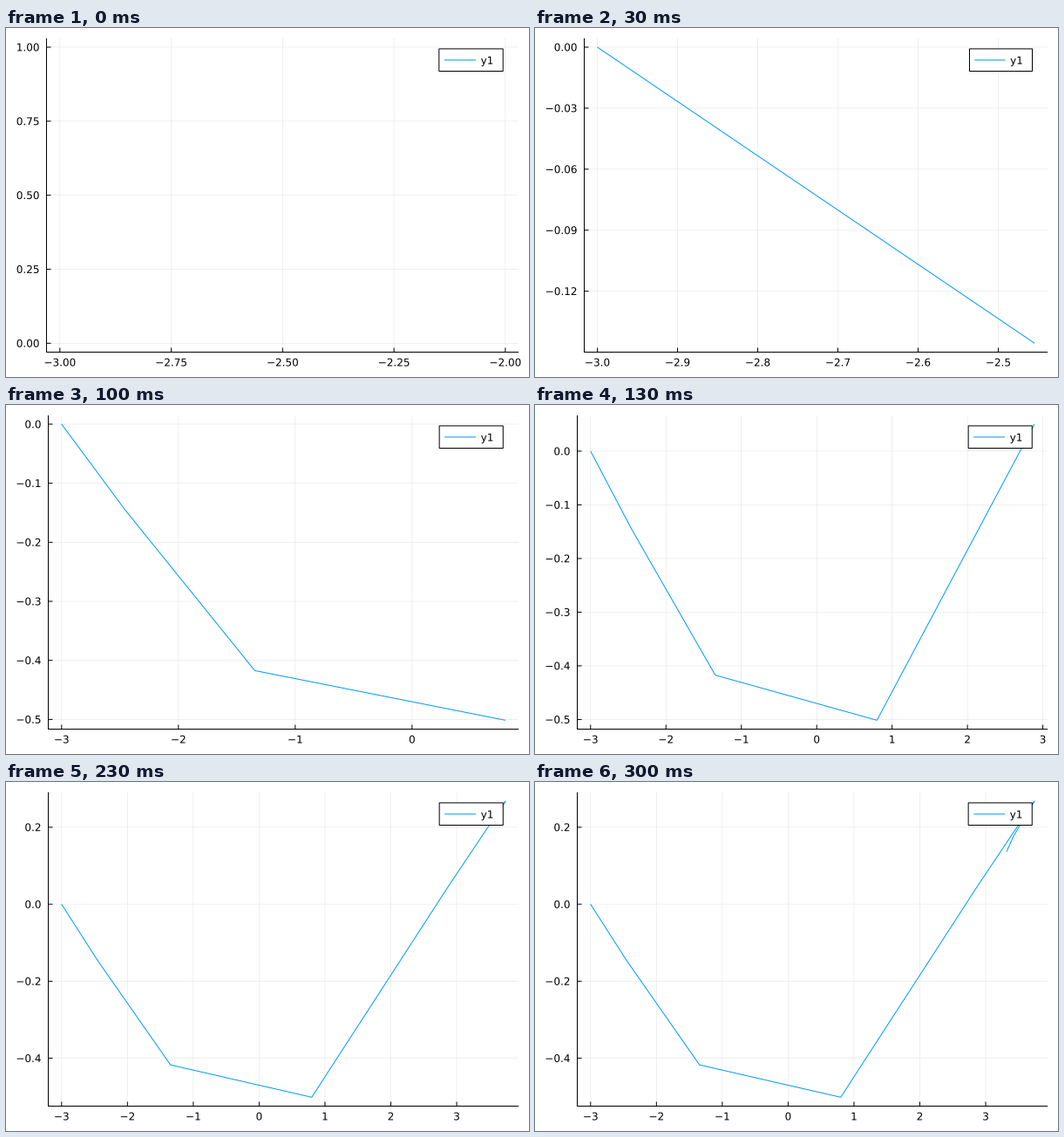
Recreate the animation shown at these times as a matplotlib script. Size 600 by 400 pixels, loop 0.33 s.

```python
import math

import matplotlib.pyplot as plt
from matplotlib.animation import FuncAnimation
from matplotlib.patches import PathPatch, Rectangle
from matplotlib.textpath import TextPath
from matplotlib.transforms import Affine2D

W, H, DPI = 600, 400, 100
PX = 72 / DPI
BLUE = "#009afa"
TOP, BOTTOM, RIGHT = 11.8, 371.5, 588.2
PAD = 0.03
FONT_SIZE = 12
TICK_LEN = 5
TICK_MS = 10
LOOP_TICKS = 33

PATH = [(-3, 0), (-2.4547, -0.1456), (-1.346, -0.4173), (0.799, -0.5014),
        (2.888, 0.0503), (3.740, 0.2677), (3.655, 0.243), (3.54, 0.211),
        (3.424, 0.177), (3.318, 0.1366)]

# left edge, then step and decimals of the x ticks and of the y ticks
LAYOUTS = [(46.5, 0.25, 2, 0.25, 2),
           (56.5, 0.1, 1, 0.03, 2),
           (48.5, 0.5, 1, 0.1, 1),
           (48.5, 1, 0, 0.1, 1),
           (48.5, 1, 0, 0.1, 1),
           (48.5, 1, 0, 0.2, 1)]

fig = plt.figure(figsize=(W / DPI, H / DPI), dpi=DPI, facecolor="white")
ax = fig.add_axes([0, 0, 1, 1])
ax.set_xlim(0, W)
ax.set_ylim(H, 0)
ax.axis("off")


def line(xs, ys, color="black", width=1.0, z=2, **kw):
    ax.plot(xs, ys, color=color, lw=width * PX, zorder=z, snap=False,
            solid_capstyle="butt", scalex=False, scaley=False, **kw)


def text(x, y, label, align="left", z=2):
    """Draw a label vertically centred on y; align uses the advance width."""
    path = TextPath((0, 0), label, size=FONT_SIZE,
                    prop={"family": "DejaVu Sans"})
    em = {"−": 0.838, ".": 0.318}
    advance = FONT_SIZE * sum(em.get(c, 0.636) for c in label)
    x -= advance * {"left": 0, "center": 0.5, "right": 1}[align]
    place = Affine2D().scale(1, -1).translate(x, y + 0.365 * FONT_SIZE)
    ax.add_patch(PathPatch(place.transform_path(path), fc="black", lw=0,
                           zorder=z, snap=False))


def limits(values):
    lo, hi = min(values), max(values)
    if lo == hi:
        hi = lo + 1
    pad = PAD * (hi - lo)
    return lo - pad, hi + pad


def ticks(lo, hi, step, decimals):
    for n in range(math.ceil(lo / step), math.floor(hi / step) + 1):
        value = n * step
        yield value, f"{value:.{decimals}f}".replace("-", "−")


def grid_line(xs, ys):
    line(xs, ys, width=0.6, z=1, alpha=0.1)


def legend(left):
    shift = left - 46.5
    box_left, box_right = 496.8 + 0.17 * shift, 570.2 + 0.03 * shift
    ax.add_patch(Rectangle((box_left, 23.9), box_right - box_left, 25.6,
                           fc="white", ec="black", lw=PX, zorder=4,
                           snap=False))
    line([502.9 + 0.13 * shift, 539 + 0.06 * shift], [36.8, 36.8], BLUE, z=5)
    text(544.6 + 0.05 * shift, 37, "y1", z=5)


def draw_plot(step):
    left, x_step, x_dec, y_step, y_dec = LAYOUTS[min(step, len(LAYOUTS) - 1)]
    points = PATH[:step + 1]
    xs, ys = zip(*points)
    x_lo, x_hi = limits(xs)
    y_lo, y_hi = limits(ys)

    def to_x(v):
        return left + (v - x_lo) / (x_hi - x_lo) * (RIGHT - left)

    def to_y(v):
        return BOTTOM - (v - y_lo) / (y_hi - y_lo) * (BOTTOM - TOP)

    for value, label in ticks(x_lo, x_hi, x_step, x_dec):
        x = to_x(value)
        grid_line([x, x], [TOP, BOTTOM])
        line([x, x], [BOTTOM, BOTTOM - TICK_LEN])
        text(x, 383.1, label, "center")
    for value, label in ticks(y_lo, y_hi, y_step, y_dec):
        y = to_y(value)
        grid_line([left, RIGHT], [y, y])
        line([left, left + TICK_LEN], [y, y])
        text(left - 8, y, label, "right")

    line([left, left, RIGHT], [TOP, BOTTOM, BOTTOM])
    if step:
        line([to_x(v) for v in xs], [to_y(v) for v in ys], BLUE, z=3)
    legend(left)


def draw(i):
    for artist in list(ax.lines) + list(ax.patches):
        artist.remove()
    # ten steps share the loop evenly, rounded to whole ticks
    draw_plot(int((i + 0.5) * len(PATH) / LOOP_TICKS * 0.99))
    return []


anim = FuncAnimation(fig, draw, frames=LOOP_TICKS, init_func=lambda: [],
                     interval=TICK_MS, repeat=True, repeat_delay=0,
                     blit=False)
plt.show()
```
